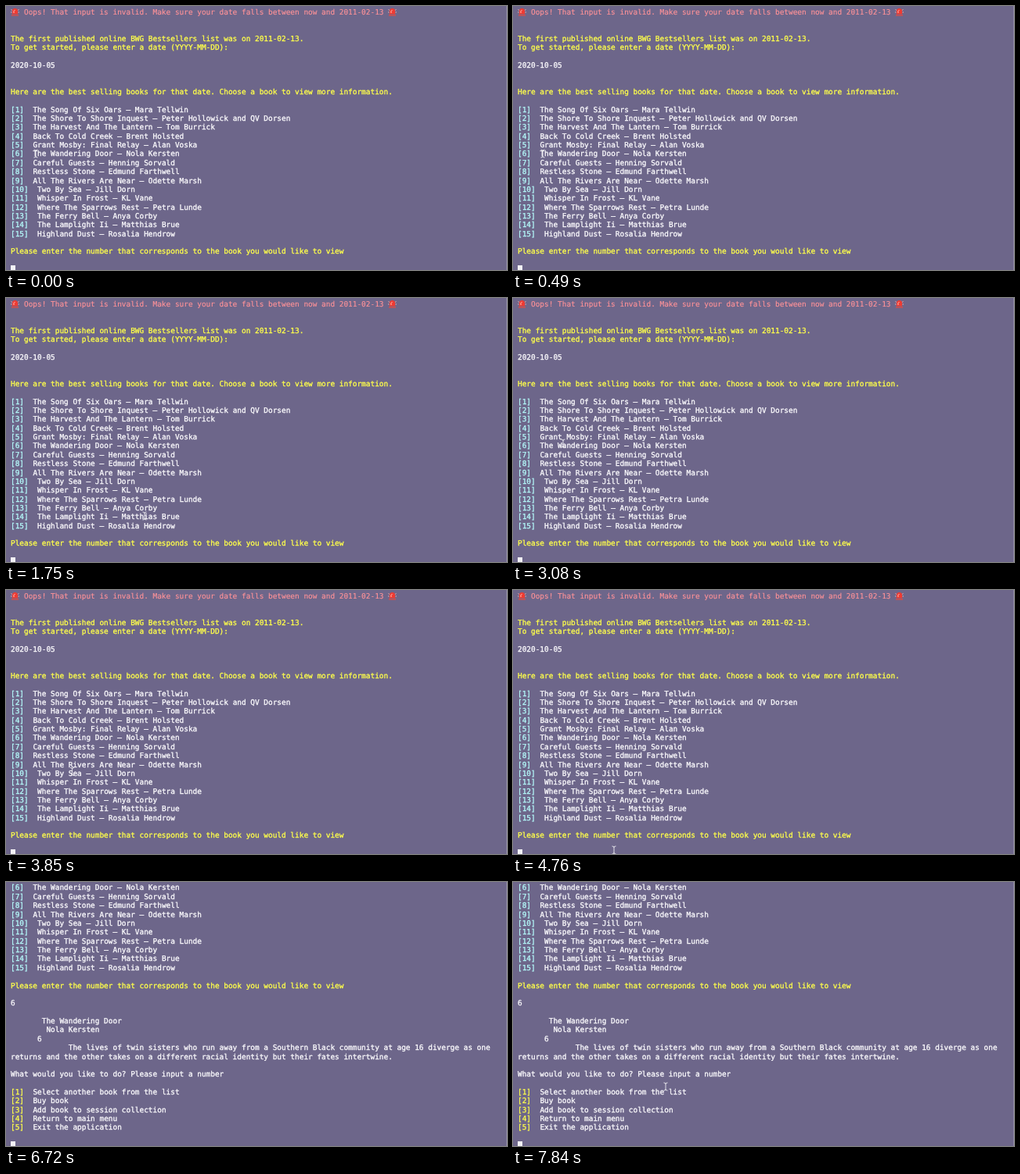
Animation, 640 px wide and 338 px high, one loop 7.91 s. Source, as an HTML page:

```html
<!DOCTYPE html>
<html lang="en">
<head>
<meta charset="utf-8">
<title>Bestsellers in the terminal</title>
<style>
html, body { margin: 0; width: 100%; height: 100%; overflow: hidden; background: #6d668a; }
svg { display: block; }
text, tspan { fill: currentColor; stroke: currentColor; stroke-width: .32px; }
text {
  font: 9.43px "DejaVu Sans Mono", monospace;
  white-space: pre;
  text-rendering: geometricPrecision;
  color: #fbfafd;
}
.y { color: #ffff4a; }
.c { color: #b4fafa; }
.p { color: #ff9298; stroke-width: .15px; }
</style>
</head>
<body>
<svg width="640" height="338" viewBox="0 0 640 338">
  <defs>
    <g id="siren">
      <path d="M.5 2.5l1.5 1M10.5 2.5l-1.5 1M0 6h1.5M11 6H9.500" stroke="#f3a9a6"/>
      <path d="M2 8.500V4.500a3.5 3.500 0 0 1 7 0v4z" fill="#ee3b33"/>
      <path d="M4 7V4.500l1.500-1.500" fill="none" stroke="#ffc2b8"/>
      <path d="M1 8.500h9v2.500H1z" fill="#b8545c"/>
    </g>
  </defs>
  <path d="M639.5 0V338" stroke="#8f8aa6"/>
  <g id="page"></g>
  <rect id="block" y="332" width="6" height="6" fill="#f3f2f7"/>
  <path id="beam" d="M-2.5-5Q0-5 0-3.5Q0-5 2.5-5M0-4V4M-2.5 5Q0 5 0 3.5Q0 5 2.5 5" fill="none" stroke="#fff" stroke-width=".8"/>
</svg>
<script>
const LOOP = 7910, STEP = 70, LEFT = 6, CELL = 5.677, LINE = 11.37;
const TYPED = 5250, SCROLLED = 5600, POINTER_BACK = 7000, INPUT_ROW = 29, SHIFT = 16;

const books = [
  "The Song Of Six Oars – Mara Tellwin",
  "The Shore To Shore Inquest – Peter Hollowick and QV Dorsen",
  "The Harvest And The Lantern – Tom Burrick",
  "Back To Cold Creek – Brent Holsted",
  "Grant Mosby: Final Relay – Alan Voska",
  "The Wandering Door – Nola Kersten",
  "Careful Guests – Henning Sorvald",
  "Restless Stone – Edmund Farthwell",
  "All The Rivers Are Near – Odette Marsh",
  "Two By Sea – Jill Dorn",
  "Whisper In Frost – KL Vane",
  "Where The Sparrows Rest – Petra Lunde",
  "The Ferry Bell – Anya Corby",
  "The Lamplight Ii – Matthias Brue",
  "Highland Dust – Rosalia Hendrow"
];
const actions = [
  "Select another book from the list",
  "Buy book",
  "Add book to session collection",
  "Return to main menu",
  "Exit the application"
];

const paint = (cls, s) => `<tspan class="${cls}">${s}</tspan>`;
const list = (items, cls) => items.map((s, i) => paint(cls, `[${i + 1}]`) + "  " + s);
const [title, author] = books[5].split(" – ");
const rows = [
  paint("p", "   Oops! That input is invalid. Make sure your date falls between now and 2011-02-13"),
  "", "",
  paint("y", "The first published online BWG Bestsellers list was on 2011-02-13."),
  paint("y", "To get started, please enter a date (YYYY-MM-DD):"),
  "", "2020-10-05", "", "",
  paint("y", "Here are the best selling books for that date. Choose a book to view more information."),
  "",
  ...list(books, "c"),
  "",
  paint("y", "Please enter the number that corresponds to the book you would like to view"),
  "", "6", "",
  " ".repeat(7) + title,
  " ".repeat(8) + author,
  " ".repeat(6) + "6",
  " ".repeat(13) + "The lives of twin sisters who run away from a Southern Black community at age 16 diverge as one",
  "returns and the other takes on a different racial identity but their fates intertwine.",
  "",
  "What would you like to do? Please input a number",
  "",
  ...list(actions, "y")
];

const page = document.getElementById("page");
const block = document.getElementById("block");
const beam = document.getElementById("beam");
const sirens = [6, 488].map(x => `<use href="#siren" x="${x}" y="2"/>`).join("");
page.innerHTML = rows.map((s, i) =>
  `<g><text x="${LEFT}" y="${10.5 + i * LINE}">${s}</text>${i ? "" : sirens}</g>`).join("");

// time, x, y
const path = [
  [0, 38, 189], [1260, 38, 189], [1750, 177, 279], [1960, 177, 279],
  [3010, 64, 186], [3430, 64, 186], [4550, 129, 333], [POINTER_BACK, 129, 333],
  [7560, 195, 262], [LOOP, 195, 262]
];

function pointerAt(t) {
  const i = path.findIndex(p => p[0] > t);
  const [t0, x0, y0] = path[i - 1], [t1, x1, y1] = path[i];
  const u = (t - t0) / (t1 - t0), k = u * u * (3 - 2 * u);
  return [x0 + (x1 - x0) * k, y0 + (y1 - y0) * k];
}

function draw(now) {
  const t = Math.floor(now % LOOP / STEP) * STEP;
  const typed = t >= TYPED, scrolled = t >= SCROLLED;
  const top = scrolled ? SHIFT : 0;
  const end = scrolled ? rows.length : INPUT_ROW + typed;
  [...page.children].forEach((row, i) => {
    row.style.display = i >= top && i < end ? "" : "none";
  });
  page.setAttribute("transform", `translate(0 ${-top * LINE})`);
  block.setAttribute("x", LEFT + (typed && !scrolled ? CELL : 0));
  beam.style.display = typed && t < POINTER_BACK ? "none" : "";
  beam.setAttribute("transform", `translate(${pointerAt(t)})`);
  requestAnimationFrame(() => draw(performance.now() - start));
}

const start = performance.now();
draw(0);
</script>
</body>
</html>
```
